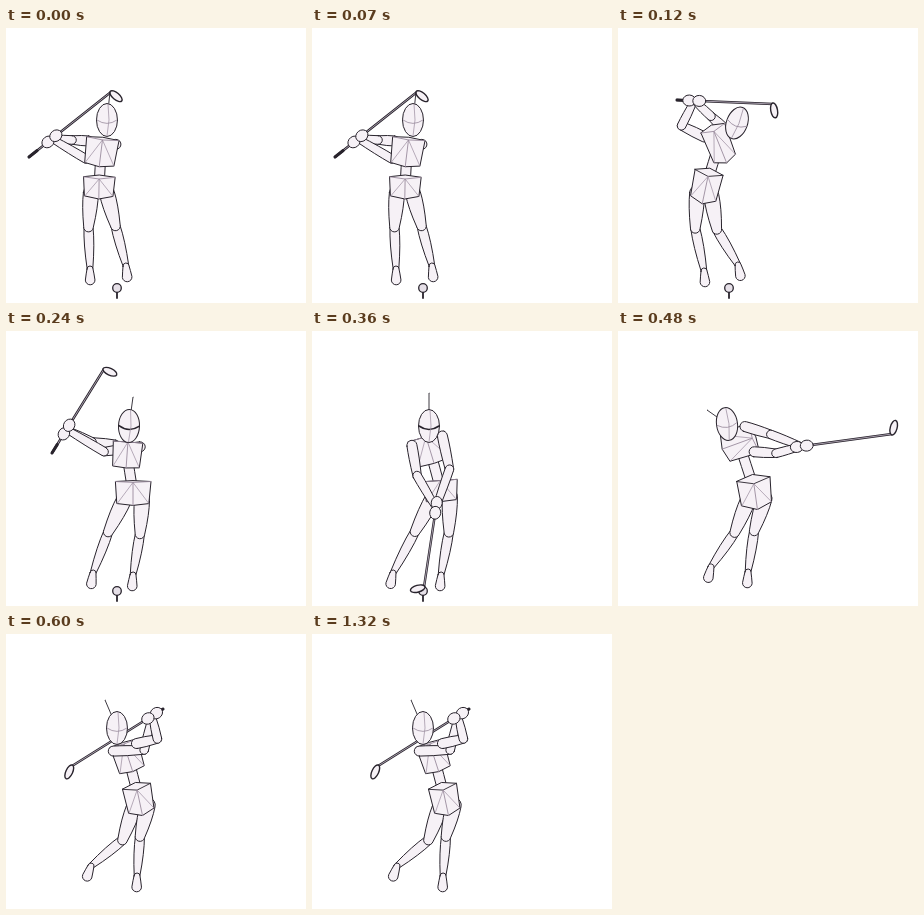
An HTML page with a canvas for the animation above (1800 ms loop, 300x275 px).

```html
<!DOCTYPE html>
<html lang="en">
<head>
<meta charset="utf-8">
<title>Golf swing</title>
<style>
html, body { margin: 0; width: 100%; height: 100%; overflow: hidden; background: #fff; }
canvas { display: block; width: 100vw; height: 100vh; }
</style>
</head>
<body>
<canvas id="stage"></canvas>
<script>
const W = 300, H = 275, STEP = 120, LOOP = 1800, RAD = Math.PI / 180;
const INK = '#28232c', SOFT = '#9a8c9e', SKIN = '#f6f1f6', PALE = '#e6e0e8';
const canvas = document.getElementById('stage');
const ctx = canvas.getContext('2d');

// head: x, y, tilt; chest and pelvis: x, y, width, height, tilt, depth
// legs: ankle x, y, knee bend; arms: elbow bends; club: grip, tip, face angle; hold: hands along the shaft
const poses = [
  { head: [101, 92, 0], chest: [95, 124, 33, 27, 7, 0.05], pelvis: [93, 159, 32, 20, 1, 0.1],
    legs: [[84, 241, 2], [120, 238, 0]], arms: [0, -17],
    club: [23, 129, 105, 64, 40], hold: 0.28, plume: [104, 64], ball: true },
  { head: [119, 95, 20], chest: [101, 116, 26, 34, -22, 0.1], pelvis: [88, 158, 29, 28, 12, 0.15],
    legs: [[86, 243, 5], [120, 237, 7]], arms: [-19, 0],
    club: [59, 72, 155, 76, 80], hold: 0.18, ball: true },
  { head: [123, 95, 2], chest: [121, 124, 30, 26, 4, 0], pelvis: [127, 162, 36, 23, 0, 0.04],
    legs: [[87, 242, 2], [127, 244, -2]], arms: [-4, -13],
    club: [46, 122, 98, 38, 25], hold: 0.28, plume: [127, 66], visor: true, ball: true },
  { head: [117, 95, 0], chest: [118, 119, 38, 28, -17, 0], pelvis: [129, 160, 34, 21, -4, 0],
    legs: [[81, 242, 0], [129, 244, -3]], arms: [6, -10], front: true,
    club: [125, 170, 112, 256, 165], hold: 0.08, plume: [117, 62], visor: true, ball: true },
  { head: [109, 93, -8], chest: [121, 112, 32, 32, 70, 0.06], pelvis: [137, 161, 34, 26, -8, 0.18],
    legs: [[93, 236, -4], [130, 241, 3]], arms: [-1, 4], front: true,
    club: [164, 118, 274, 103, -75], hold: 0.18, plume: [89, 79] },
  { head: [111, 94, 0], chest: [122, 123, 29, 29, -18, 0.03], pelvis: [133, 165, 29, 26, -12, 0.15],
    legs: [[85, 232, -10], [131, 242, 3]], arms: [20, 16], front: true,
    club: [157, 75, 66, 132, 115], hold: 0.12, plume: [99, 66] }
];

function paint(fill, color = INK, width = 1) {
  if (fill) { ctx.fillStyle = fill; ctx.fill(); }
  ctx.strokeStyle = color;
  ctx.lineWidth = width;
  ctx.stroke();
}

function line(points, color = INK, width = 1) {
  ctx.beginPath();
  for (const p of points) ctx.lineTo(p[0], p[1]);
  paint(null, color, width);
}

function oval(x, y, rx, ry, angle = 0, fill = SKIN, width = 1) {
  ctx.beginPath();
  ctx.ellipse(x, y, rx, ry, angle, 0, 2 * Math.PI);
  paint(fill, INK, width);
}

const mix = (a, b, f) => [a[0] + (b[0] - a[0]) * f, a[1] + (b[1] - a[1]) * f];

function joint(a, b, bend) {
  const m = mix(a, b, 0.45), len = Math.hypot(b[0] - a[0], b[1] - a[1]);
  return [m[0] - (b[1] - a[1]) / len * bend, m[1] + (b[0] - a[0]) / len * bend];
}

// Turns fractions of a block's size into stage coordinates
function spot([x, y, w, h, tilt], u, v) {
  const c = Math.cos(tilt * RAD), s = Math.sin(tilt * RAD);
  return [x + u * w * c - v * h * s, y + u * w * s + v * h * c];
}

// Round-ended segment with swelling sides; ra and rb are end radii
function limb(a, b, ra, rb, swell = 1) {
  const dir = Math.atan2(b[1] - a[1], b[0] - a[0]), q = Math.PI / 2;
  const m = mix(a, b, 0.4), r = (ra + rb) / 2 + swell * 2;
  const nx = -Math.sin(dir) * r, ny = Math.cos(dir) * r;
  ctx.beginPath();
  ctx.arc(a[0], a[1], ra, dir + q, dir + 3 * q);
  ctx.quadraticCurveTo(m[0] - nx, m[1] - ny, b[0] + Math.sin(dir) * rb, b[1] - Math.cos(dir) * rb);
  ctx.arc(b[0], b[1], rb, dir - q, dir + q);
  ctx.quadraticCurveTo(m[0] + nx, m[1] + ny, a[0] + nx / r * ra, a[1] + ny / r * ra);
  ctx.closePath();
  paint(SKIN);
}

function block(part) {
  const d = part[5], at = (u, v) => spot(part, u, v);
  const left = at(-0.5, -0.5), right = at(0.5, -0.5), ridge = at(0, d - 0.5), foot = at(0, 0.5 + d);
  const lowLeft = at(-0.44, 0.46), lowRight = at(0.44, 0.46);
  ctx.beginPath();
  for (const p of [left, at(0, -0.5 - d), right, lowRight, foot, lowLeft]) ctx.lineTo(p[0], p[1]);
  ctx.closePath();
  paint(SKIN);
  line([left, ridge, right], d > 0.12 ? INK : SOFT, 0.9);
  line([lowLeft, ridge, lowRight], SOFT, 0.7);
  line([ridge, foot], SOFT, 0.9);
}

function leg(hip, [x, y, bend]) {
  const ankle = [x, y], knee = joint(hip, ankle, bend);
  const dx = x - knee[0], dy = y - knee[1] + 60, len = Math.hypot(dx, dy);
  limb(knee, ankle, 4.5, 2.8);
  limb(ankle, [x + dx / len * 11, y + dy / len * 11], 3, 4.8, 0);
  limb(hip, knee, 7.5, 4.8);
}

function arm(shoulder, hand, bend) {
  const elbow = joint(shoulder, hand, bend);
  limb(shoulder, elbow, 5, 4.2, 0.4);
  limb(elbow, hand, 4.3, 3.2, 0.4);
}

function reach({ chest, arms, club, hold }) {
  const [x1, y1, x2, y2, face] = club;
  const grip = [x1, y1], tip = [x2, y2], a = face * RAD;
  const hand = mix(grip, tip, hold), dir = Math.atan2(y2 - y1, x2 - x1);
  line([grip, tip], INK, 2.4);
  line([grip, tip], '#b5abb9', 0.9);
  line([grip, mix(grip, tip, 0.1)], INK, 3);
  oval(x2 + 6.5 * Math.cos(a), y2 + 6.5 * Math.sin(a), 7.5, 3.4, a, SKIN, 1.4);
  arms.forEach((bend, i) => arm(spot(chest, i ? 0.42 : -0.42, -0.35), hand, bend));
  for (const k of [-5, 5]) {
    oval(hand[0] + k * Math.cos(dir), hand[1] + k * Math.sin(dir), 6.5, 5.5, dir);
  }
}

function face([x, y, tilt], visor) {
  ctx.save();
  ctx.translate(x, y);
  ctx.rotate(tilt * RAD);
  oval(0, 0, 10.5, 16.5);
  ctx.beginPath();
  ctx.moveTo(-10, 0);
  ctx.quadraticCurveTo(0, 7, 10, 0);
  paint(null, visor ? INK : SOFT, visor ? 1.6 : 0.8);
  line([[1, -16], [2, 0], [0, 16]], SOFT, 0.7);
  ctx.restore();
}

function draw(pose) {
  const { head, chest, pelvis, legs, plume } = pose;
  if (pose.ball) {
    line([[111, 264], [111, 270]], INK, 1.8);
    oval(111, 260, 4.3, 4.3, 0, PALE, 1.3);
  }
  legs.forEach((l, i) => leg(spot(pelvis, i ? 0.25 : -0.25, 0.3), l));
  limb(chest, pelvis, 5, 5, 0);
  block(pelvis);
  if (!pose.front) reach(pose);
  block(chest);
  if (pose.front) reach(pose);
  if (plume) line([plume, head], INK, 0.9);
  face(head, pose.visor);
}

function frame() {
  const t = performance.now() % LOOP;
  const k = window.devicePixelRatio || 1;
  const w = Math.round(innerWidth * k), h = Math.round(innerHeight * k);
  if (canvas.width !== w || canvas.height !== h) {
    canvas.width = w;
    canvas.height = h;
  }
  ctx.setTransform(w / W, 0, 0, h / H, 0, 0);
  ctx.fillStyle = '#fff';
  ctx.fillRect(0, 0, W, H);
  ctx.lineJoin = ctx.lineCap = 'round';
  draw(poses[Math.min(poses.length - 1, Math.floor(t / STEP))]);
  requestAnimationFrame(frame);
}
frame();
</script>
</body>
</html>
```
